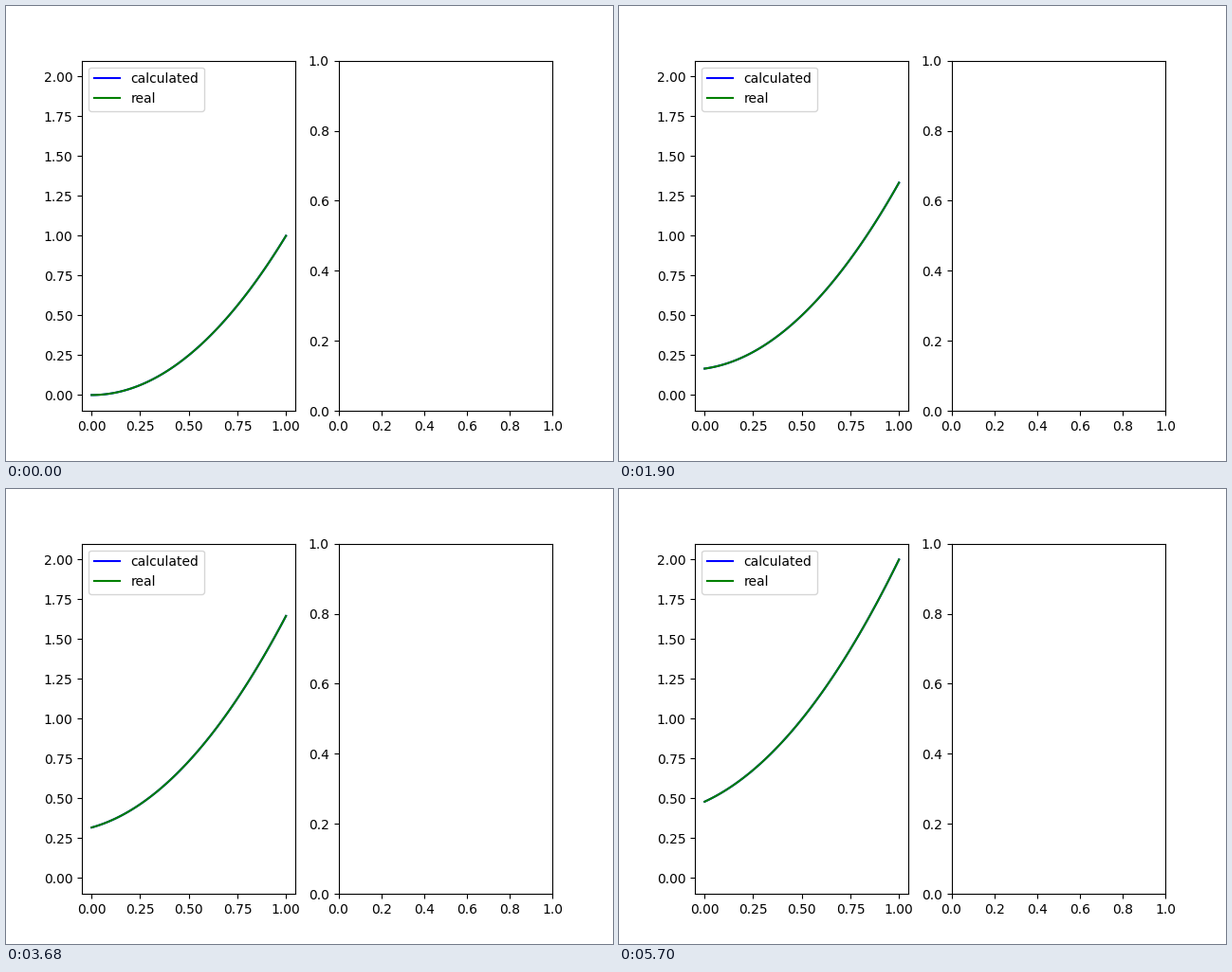
Recreate the animation shown at these times as a matplotlib script. Size 640x480 px, loop 5720 ms.

```python
import numpy as np
import matplotlib.pyplot as plt
from matplotlib.animation import FuncAnimation

FRAMES = 286
INTERVAL = 20  # ms

x = np.linspace(0, 1, 101)


def solution(t):
    """Curve that starts as x**2, with ends moving as sin(t/2) and 1 + t."""
    return x**2 + x * t + np.sin(t * (1 - x) / 2)


fig, (ax, empty) = plt.subplots(1, 2, figsize=(6.4, 4.8), dpi=100)
ax.set(xlim=(-0.05, 1.05), ylim=(-0.1, 2.1))
ax.set_xticks(np.arange(0, 1.01, 0.25))
ax.set_yticks(np.arange(0, 2.01, 0.25))
empty.set(xlim=(0, 1), ylim=(0, 1))

lines = [
    ax.plot(x, solution(0), color=color, label=label)[0]
    for color, label in (("blue", "calculated"), ("green", "real"))
]
ax.legend(loc="upper left")


def update(i):
    y = solution(i / (FRAMES - 1))
    for line in lines:
        line.set_ydata(y)
    return lines


anim = FuncAnimation(fig, update, frames=FRAMES, interval=INTERVAL,
                     repeat=True, repeat_delay=0, blit=False)
plt.show()
```
